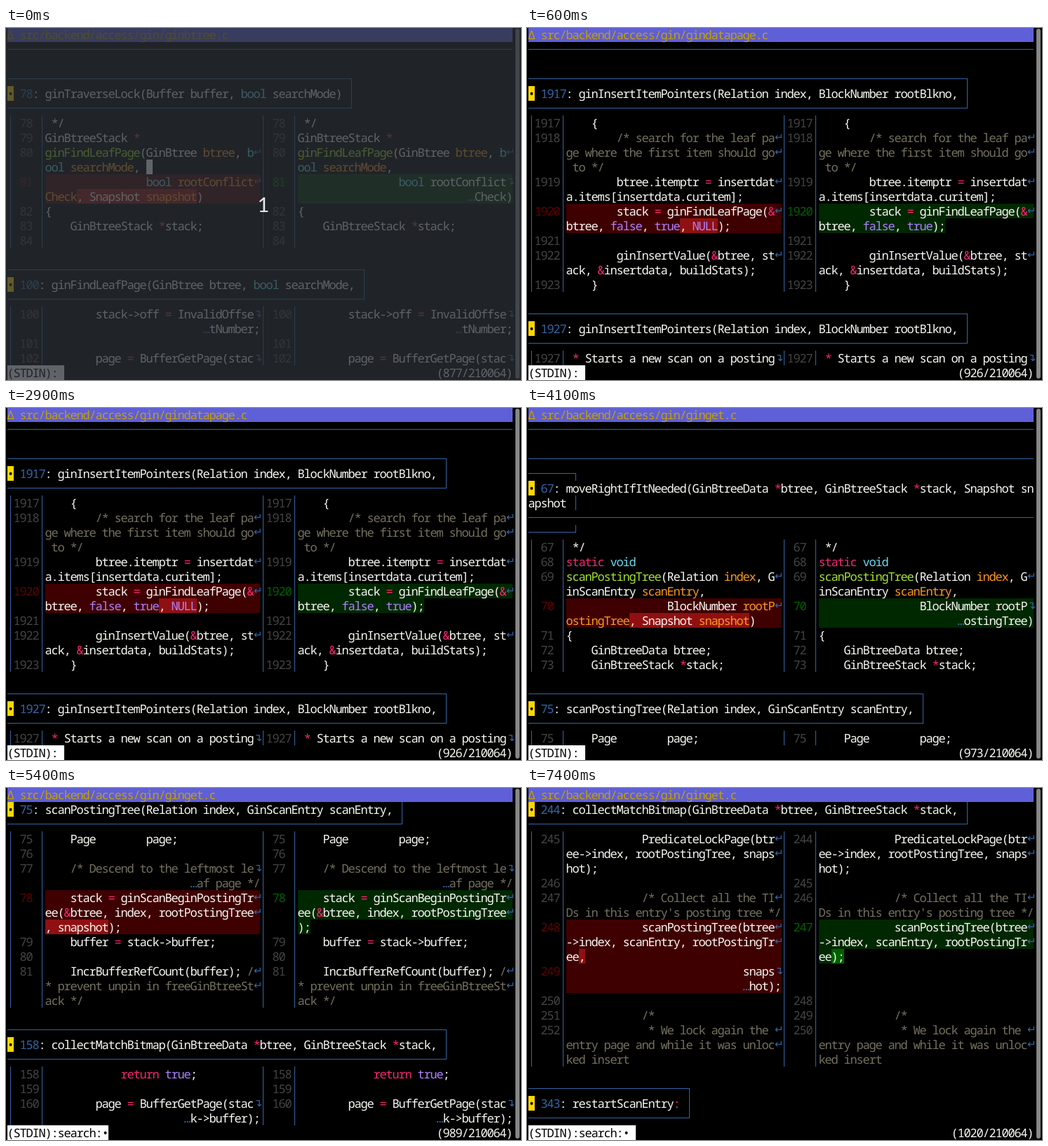
These frames come from a looping animation (734x503 px, 8 s). An HTML page:

```html
<!DOCTYPE html>
<html lang="en">
<head>
<meta charset="utf-8">
<title>Side-by-side diff in a pager</title>
<style>
html, body { margin: 0; width: 734px; height: 503px; overflow: hidden; background: #000; }
body { position: relative; }
.screen { position: absolute; inset: 0; visibility: hidden; }
.screen i, #thumb, #dim, #cursor { position: absolute; }
.screen span {
  position: absolute; z-index: 1; margin-left: calc((9px - 1ch) / 2); white-space: pre;
  font: condensed 17px/21px "Noto Sans Mono", monospace;
  letter-spacing: calc(9px - 1ch); text-rendering: geometricPrecision;
}
.screen .wrap { margin-left: 0; font: 15px/21px "DejaVu Sans", sans-serif; letter-spacing: 0; }
#cursor { top: 482px; width: 9px; height: 21px; background: #fff; }
#thumb { left: 726px; top: 1px; width: 6px; height: 500px; border-radius: 3px; background: #868686; }
#dim {
  inset: 0; z-index: 5; background: rgba(43, 48, 54, .75); color: #e4e6e6;
  font: 29px/503px Lato, sans-serif; text-align: center;
}
</style>
</head>
<body>
<div id="cursor"></div>
<div id="thumb"></div>
<div id="dim">1</div>
<script>
// Row syntax: "─" rule, "┐n" / "┘n" box edge ending at column n, "•" hunk header,
// ">" wrapped header, otherwise "number|left|number|right" (right defaults to left).
// Inline: ~green~ ^orange^ #grey# @cyan@ %pink% «emphasis»
const BTREE = `─

┐54
• 78: ginTraverseLock(Buffer buffer, bool searchMode)
┘54
78| */|78
79|GinBtreeStack *|79
80|~ginFindLeafPage~(GinBtree ^btree^, @b@↵|80
|@ool@ ^searchMode^, █||@ool@ ^searchMode^,
-81|                bool ^rootConflict^↵|+81|                bool rootConflict↴
-|^Check^«, Snapshot ^snapshot^»)|+|…Check)
82|{|82
83|    GinBtreeStack *stack;|83
84||84

┐56
• 100: ginFindLeafPage(GinBtree btree, bool searchMode,
┘56
100|        stack->off = InvalidOffse↴|100
|…tNumber;|
101||101
102|        page = BufferGetPage(stac↴|102`;

const DATAPAGE = `─

┐69
• 1917: ginInsertItemPointers(Relation index, BlockNumber rootBlkno,
┘69
1917|    {|1917
1918|        #/* search for the leaf pa#↵|1918
|#ge where the first item should go#↵|
|# to */#|
1919|        btree.itemptr = insertdat↵|1919
|a.items[insertdata.curitem];|
-1920|        stack = ginFindLeafPage(&↵|+1920
-|btree, false, true«, NULL»);|+|btree, false, true);
1921||1921
1922|        ginInsertValue(&btree, st↵|1922
|ack, &insertdata, buildStats);|
1923|    }|1923

┐69
• 1927: ginInsertItemPointers(Relation index, BlockNumber rootBlkno,
┘69
1927| * Starts a new scan on a posting↴|1927`;

const GET = `─

─
┐7
• 67: moveRightIfItNeeded(GinBtreeData *btree, GinBtreeStack *stack, Snapshot sn
>apshot
─
┘7
67| */|67
68|static void|68
69|~scanPostingTree~(Relation ^index^, G↵|69
|inScanEntry ^scanEntry^,|
-70|                BlockNumber ^rootP^↵|+70|                BlockNumber rootP↴
-|^ostingTree^«, Snapshot ^snapshot^»)|+|…ostingTree)
71|{|71
72|    GinBtreeData btree;|72
73|    GinBtreeStack *stack;|73

┐62
• 75: scanPostingTree(Relation index, GinScanEntry scanEntry,
┘62
75|    Page        page;|75
76||76
77|    #/* Descend to the leftmost le#↴|77
|…#af page */#|
-78|    stack = ginScanBeginPostingTr↵|+78
-|ee(&btree, index, rootPostingTree↵|+
-|«, snapshot»);|+|);
79|    buffer = stack->buffer;|79
80||80
81|    IncrBufferRefCount(buffer); #/#↵|81
|#* prevent unpin in freeGinBtreeSt#↵|
|#ack */#|

┐69
• 158: collectMatchBitmap(GinBtreeData *btree, GinBtreeStack *stack,
┘69
158|            return true;|158
159||159
160|        page = BufferGetPage(stac↴|160
|…k->buffer);|
-161|        TestForOldSnapshot(snapsh↵||
-|ot, btree->index, page);||
162|        itup = (IndexTuple) PageG↵|161
|etItem(page, PageGetItemId(page, ↵|
|stack->off));|
163||162
164|        #/*#|163

┐69
• 244: collectMatchBitmap(GinBtreeData *btree, GinBtreeStack *stack,
┘69
245|            PredicateLockPage(btr↵|244
|ee->index, rootPostingTree, snaps↵|
|hot);|
246||245
247|            #/* Collect all the TI#↵|246
|#Ds in this entry's posting tree */#|
-248|            scanPostingTree(btree↵|+247
-|->index, scanEntry, rootPostingTr↵|+
-|ee«,»|+|ee«);»
-249|                            snaps↴||
-|…hot);||
250||248
251|            #/*#|249
252|             #* We lock again the #↵|250
|#entry page and while it was unloc#↵|
|#ked insert#|

┐25
• 343: restartScanEntry%:%
┘25`;

const BLUE = '#3465a4', PINK = '#f92672', CYAN = '#66d9ef';
const MARK = { '~': '#a6e22e', '^': '#fd971f', '#': '#75715e', '@': CYAN, '%': PINK };
const DIFF = {
  '-': { num: '#5f0000', bg: '#3f0001', emph: '#901011' },
  '+': { num: '#005f00', bg: '#002800', emph: '#006000' }
};
const TOKEN = /([~^#@%])(.+?)\1|(\b(?:static|return)\b|\*(?!\/)|&|=)|\b(bool|void)\b|\b(true|false|NULL)\b|…|[↵↴«»█]/g;
const CW = 9, RH = 21;
const colX = c => 2 + c * CW, rowY = r => r * RH - 1;
const visible = s => s.replace(/[~^#@%«»]/g, '');

function screen(rows, file, count, prompt) {
  const root = document.createElement('div');
  root.className = 'screen';

  function rect(x, y, w, h, color) {
    const el = document.createElement('i');
    el.style.cssText = `left:${x}px;top:${y}px;width:${w}px;height:${h}px;background:${color}`;
    root.append(el);
  }
  const cells = (c, r, n, color) => rect(colX(c), rowY(r), n * CW, RH, color);
  const bar = (c, r, from = 0, to = RH) => rect(colX(c) + 4, rowY(r) + from, 1, to - from, BLUE);
  const rule = (r, w) => rect(2, rowY(r) + 10, w, 1, BLUE);

  function put(c, r, text, color, cls = '') {
    if (!text.trim()) return;
    const el = document.createElement('span');
    el.className = cls;
    el.textContent = text;
    el.style.cssText = `left:${colX(c)}px;top:${rowY(r)}px;color:${color}`;
    root.append(el);
  }

  function code(c, r, s, emph) {
    const start = c;
    let last = 0, open = 0;
    const add = (text, color) => { put(c, r, text, color); c += text.length; };
    for (const m of s.matchAll(TOKEN)) {
      const t = m[0];
      add(s.slice(last, m.index), '#f8f8f2');
      last = m.index + t.length;
      if (t === '«') open = c;
      else if (t === '»') cells(open, r, c - open, emph);
      else if (t === '█') cells(c++, r, 1, '#fff');
      else if (t === '↵' || t === '↴') put(start + 33, r, t, BLUE, 'wrap');
      else if (m[1]) add(m[2], MARK[m[1]]);
      else add(t, m[3] ? PINK : m[4] ? CYAN : m[5] ? '#ae81ff' : BLUE);
    }
    add(s.slice(last), '#f8f8f2');
  }

  function half(c, r, num, s, fill) {
    const kind = DIFF[num[0]] || {};
    const n = num.replace(/\D/g, '');
    bar(c, r);
    bar(c + 5, r);
    put(c + (n.length > 3 ? 1 : 2), r, n, kind.num || '#444');
    if (s[0] === '…') s = ' '.repeat(34 - visible(s).length) + s;
    if (kind.bg) cells(c + 6, r, fill || visible(s).length, kind.bg);
    code(c + 6, r, s, kind.emph);
  }

  function row(s, r) {
    const head = s[0], rest = s.slice(1), len = visible(s).length;
    if (!s) return;
    if (head === '─') rule(r, 720);
    else if (head === '┐' || head === '┘') {
      rule(r, +rest * CW + 5);
      head === '┐' ? bar(+rest, r, 10) : bar(+rest, r, 0, 11);
    } else if (head === '>') {
      code(0, r, rest);
      bar(len, r);
    } else if (head === '•') {
      const [, num, text] = s.match(/^• (\d+)(.*)/);
      cells(0, r, 1, '#ffd700');
      put(0, r, '•', '#000');
      put(2, r, num, BLUE);
      code(2 + num.length, r, text);
      if (len < 79) bar(len + 1, r);
    } else {
      const [n1, left, n2, right = left] = s.split('|');
      half(0, r, n1, left, 34);
      half(40, r, n2, right);
    }
  }

  rect(2, 0, 720, 20, '#5f5fd7');
  put(0, 0, 'Δ src/backend/access/gin/' + file, '#c4a000');
  rows.forEach((s, i) => row(s, i + 1));
  cells(0, 23, prompt.length, '#fff');
  put(0, 23, prompt, '#000');
  const pos = `(${count}/210064)`;
  put(80 - pos.length, 23, pos, '#f8f8f2');
  document.body.prepend(root);
  return { root, end: prompt.length };
}

const get = GET.split('\n');
const view = (from, count, prompt = '(STDIN):search:•') =>
  screen(get.slice(from, from + 22), 'ginget.c', count, prompt);

const pages = [
  screen(BTREE.split('\n'), 'ginbtree.c', 877, '(STDIN):'),
  screen(DATAPAGE.split('\n'), 'gindatapage.c', 926, '(STDIN):'),
  view(0, 973, '(STDIN):'),
  view(4, 976),
  view(19, 989),
  view(35, 1005),
  view(50, 1020)
];

// [start ms, page, cursor on]
const steps = [
  [0, 0, 1], [500, 0, 0],
  [600, 1, 1], [1100, 1, 0], [1700, 1, 1], [2300, 1, 0], [2900, 1, 1],
  [3200, 2, 1], [3800, 2, 0], [4100, 2, 1],
  [4200, 3, 1], [4700, 3, 0], [4800, 3, 1],
  [4900, 4, 1], [5400, 4, 0], [5500, 4, 1],
  [5600, 5, 1], [6100, 5, 0],
  [6200, 6, 1], [6800, 6, 0], [7400, 6, 1]
];
const LOOP = 8000;
const cursor = document.getElementById('cursor');
const dim = document.getElementById('dim');
const show = (el, on) => { el.style.visibility = on ? 'visible' : 'hidden'; };
const t0 = performance.now();

function draw() {
  const t = Math.max(0, performance.now() - t0) % LOOP;
  const [, page, on] = steps.findLast(s => s[0] <= t);
  pages.forEach((p, i) => show(p.root, i === page));
  cursor.style.left = colX(pages[page].end) + 'px';
  show(cursor, on);
  show(dim, t < 100);
  requestAnimationFrame(draw);
}
draw();
</script>
</body>
</html>
```
